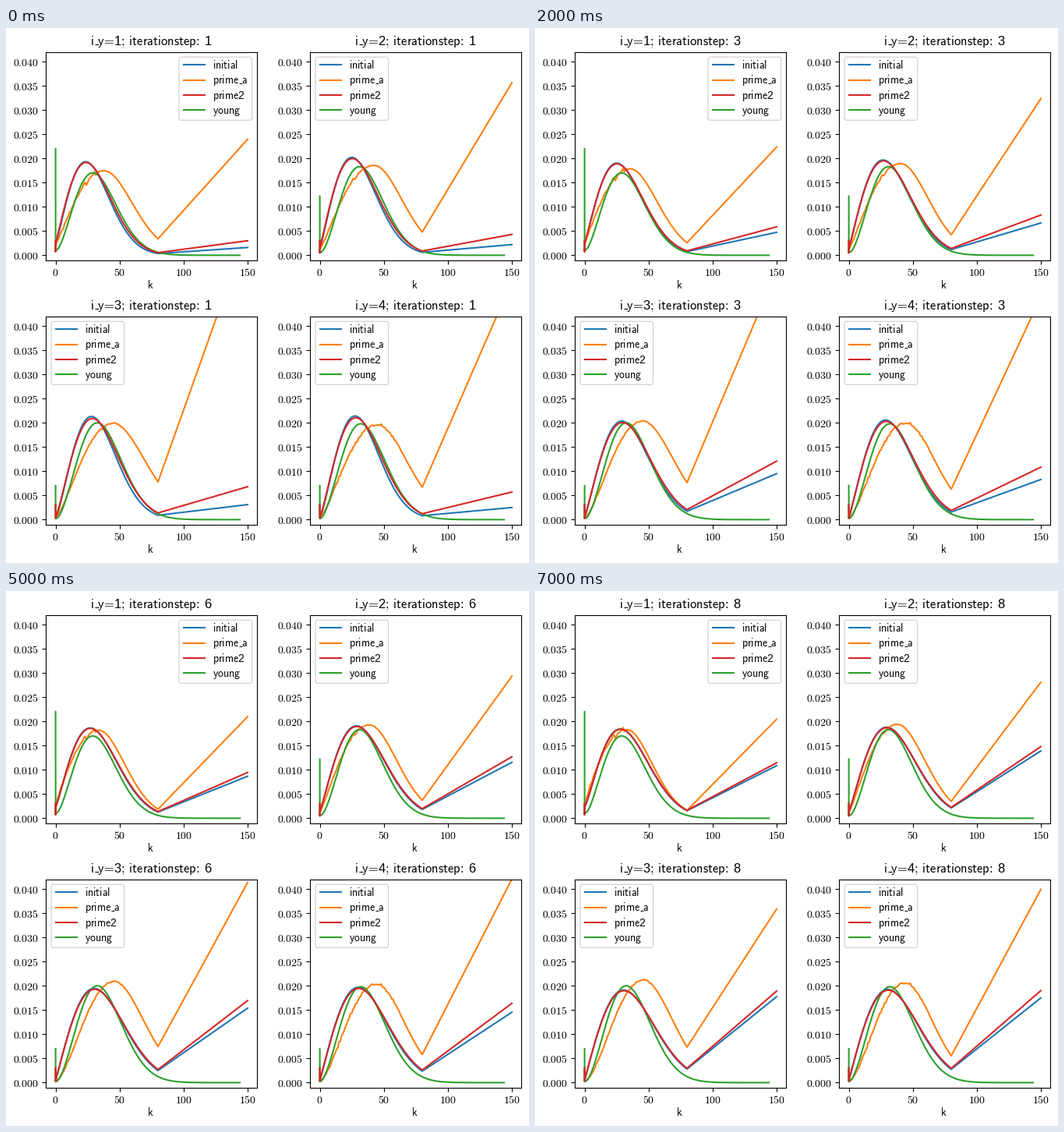
Write a matplotlib script that moves like this. It is 671 by 686 pixels and loops after 8000 ms.

```python
import numpy as np
import matplotlib.pyplot as plt
from matplotlib.animation import FuncAnimation
from matplotlib.lines import Line2D
from matplotlib.patches import FancyBboxPatch
from matplotlib.transforms import Affine2D

plt.rcParams["mathtext.fontset"] = "cm"
plt.rcParams["font.family"] = "Liberation Sans"

W, H, DPI = 671, 686, 100
FRAMES, INTERVAL = 8, 1000
LEFT, TOP, PITCH = 51.3, 30.6, 339
BOX_W, BOX_H = 271, 267
LEGEND_W, LEGEND_H, LEGEND_PAD = 93.6, 81, 6.7
UNIT = 1e-4
KNEE, LAST = 80, 150
K = np.r_[0.3, 1:KNEE + 1]
BLUE, ORANGE, GREEN, RED = "#1f77b4", "#ff7f0e", "#2ca02c", "#d62728"
LEGEND = [("initial", BLUE), (r"prime\hspace{0.41}a", ORANGE),
          (r"prime\mathregular{2}", RED), ("young", GREEN)]

# Heights are in UNIT; pairs are the values at the first and last step.
# gap: how far prime2 ends above initial; pace: slowdown from step to step.
PANELS = [
    dict(base=22, spike=220, floor=1.5, pace=0.93, peak=(193, 184.5),
         mode=(23.5, 28), tip=(16, 108.5), gap=(14, 6), young=(170, 29, 6),
         prime_a=dict(peak=(174.5, 183), mode=(38, 33), low=(34, 16),
                      tip=(239.5, 204.5), rise=(0.9, 0.75), pace=0.8),
         rough=(2.5, 3, 32)),
    dict(base=12, spike=122, floor=3.2, pace=0.88, peak=(202, 188),
         mode=(25, 29.5), tip=(22, 139), gap=(21, 9), young=(183, 31, 8.5),
         prime_a=dict(peak=(185.5, 194), mode=(42.5, 38), low=(48, 35),
                      tip=(356, 281), rise=(1, 1), pace=0.82),
         rough=(1.4, 6, 32)),
    dict(base=4, spike=70, floor=5, pace=0.82, peak=(213, 191),
         mode=(28, 30.5), tip=(31, 177.5), gap=(37, 11.5),
         young=(200, 32.5, 12.5),
         prime_a=dict(peak=(199, 212), mode=(45, 46), low=(78, 73.5),
                      tip=(598, 358.5), rise=(1.25, 1.55), pace=0.92),
         rough=(0.8, 6, 55)),
    dict(base=4, spike=70, floor=4.8, pace=0.875, peak=(214, 192.5),
         mode=(27.5, 30.5), tip=(25, 175), gap=(32, 15), young=(198, 32, 12),
         prime_a=dict(peak=(196, 206), mode=(45, 44), low=(67, 55.5),
                      tip=(492, 399), rise=(1.25, 1.5), pace=0.92),
         rough=(1.5, 6, 66)),
]


def ease(step, pair, pace):
    """Go from first to last value, each step `pace` times the one before."""
    part = (1 - pace ** (step - 1)) / (1 - pace ** (FRAMES - 1))
    return pair[0] + (pair[1] - pair[0]) * part


def hump(k, peak, mode, low, rise=None):
    """Single hump that comes down to `low` at the knee."""
    end = KNEE / mode
    fall = np.log(low / peak) / (np.log(end) + (1 - end**2) / 2)
    r = k / mode
    power = np.where(r < 1, rise or fall, fall)
    return peak * r**power * np.exp(power / 2 * (1 - r**2))


def curve(panel, body, tip):
    """Spike at k=0, the hump, then a straight run to the last point."""
    body = np.maximum(body + panel["base"] * np.exp(-K / 4), 0)
    dip = 2 + panel["base"] / 4
    return np.r_[0, 0.02, K, LAST], np.r_[30, dip, body, tip] * UNIT


def curves(panel, noise, step):
    peak, mode, tip, gap = (ease(step, panel[key], panel["pace"])
                            for key in ("peak", "mode", "tip", "gap"))

    def relaxed(lift):
        low = panel["floor"] + 0.13 * (tip + lift)
        body = hump(K, peak - 0.11 * lift, mode + 0.02 * lift, low)
        return curve(panel, body, tip + lift)

    a = panel["prime_a"]
    a_peak, a_mode, a_low, a_tip, rise = (
        ease(step, a[key], a["pace"])
        for key in ("peak", "mode", "low", "tip", "rise"))
    amp, lo, hi = panel["rough"]
    wobble = amp * noise * ((K > lo) & (K < hi))
    return dict(initial=relaxed(0), prime2=relaxed(gap),
                prime_a=curve(panel, hump(K, a_peak, a_mode, a_low, rise)
                              + wobble, a_tip))


def young_curve(panel):
    k = np.linspace(0.3, 144, 160)
    y = hump(k, *panel["young"]) + panel["base"] / 2 * np.exp(-k / 4)
    dip = 2 + panel["base"] / 4
    return np.r_[0, 0.02, k], np.r_[panel["spike"], dip, y] * UNIT


fig = plt.figure(figsize=(W / DPI, H / DPI), dpi=DPI, facecolor="white")
px = Affine2D().scale(1 / W, -1 / H).translate(0, 1) + fig.transFigure


def put(x, y, body, size):
    return fig.text(x, y, rf"$\mathsf{{{body}}}$", fontsize=size,
                    transform=px, ha="left", va="baseline", zorder=8)


def stroke(x0, x1, y, color, lw, cap="butt"):
    fig.add_artist(Line2D([x0, x1], [y, y], color=color, lw=lw, transform=px,
                          solid_capstyle=cap, zorder=7))


def title(number, step):
    return (r"$\mathsf{i\hspace{0.41}y\hspace{-0.2}=\hspace{-0.2}"
            rf"\mathregular{{{number}}};\hspace{{0.2}}iterationstep"
            rf"\hspace{{-0.2}}:\hspace{{0.25}}\mathregular{{{step}}}}}$")


def legend(x, y):
    fig.add_artist(FancyBboxPatch(
        (x, y), LEGEND_W, LEGEND_H, boxstyle="round,pad=0,rounding_size=2.78",
        fc=(1, 1, 1, 0.8), ec=(0.8, 0.8, 0.8, 0.8), lw=1,
        transform=px, zorder=6))
    for i, (label, color) in enumerate(LEGEND):
        row = y + 9.9 + 19.35 * i
        stroke(x + 5.5, x + 33.3, row, color, 1.5, "projecting")
        put(x + 43.1, row + 4.9, label, 10)
        if "hspace" in label:
            stroke(x + 76.9, x + 81.1, row + 4.5, "black", 0.7)


def build(i, panel):
    x, y = LEFT + PITCH * (i % 2), TOP + PITCH * (i // 2)
    ax = fig.add_axes([x / W, 1 - (y + BOX_H) / H, BOX_W / W, BOX_H / H])
    lines = {}
    for name, color in (("initial", BLUE), ("prime_a", ORANGE),
                        ("young", GREEN), ("prime2", RED)):
        lines[name], = ax.plot([], [], color=color, lw=1.5)
    lines["young"].set_data(*young_curve(panel))
    xt, yt = range(0, LAST + 1, 50), np.arange(9) * 0.005
    ax.set_xticks(xt, [rf"$\mathrm{{{v}}}$" for v in xt])
    ax.set_yticks(yt, [rf"$\mathrm{{{v:.3f}}}$" for v in yt])
    ax.set_xlim(-7.5, 157.5)
    ax.set_ylim(-0.001, 0.042)
    put(x + BOX_W / 2 - 6, y + 303.5, "k", 10)
    # The first panel has its free corner on the right.
    inset = BOX_W - LEGEND_W - LEGEND_PAD if i == 0 else LEGEND_PAD
    legend(x + inset, y + LEGEND_PAD)
    head = put(x + 57.1, y - 9.5, "i", 11.9)
    stroke(x + 62.6, x + 67.6, y - 9.7, "black", 0.8)
    noise = np.random.default_rng(i + 1).normal(size=K.size)
    return i + 1, panel, lines, head, noise


views = [build(i, panel) for i, panel in enumerate(PANELS)]


def update(frame):
    step = frame + 1
    changed = []
    for number, panel, lines, head, noise in views:
        for name, data in curves(panel, noise, step).items():
            lines[name].set_data(*data)
        head.set_text(title(number, step))
        changed += [*lines.values(), head]
    return changed


anim = FuncAnimation(fig, update, frames=FRAMES, interval=INTERVAL,
                     init_func=lambda: update(0), repeat=True)
plt.show()
```
